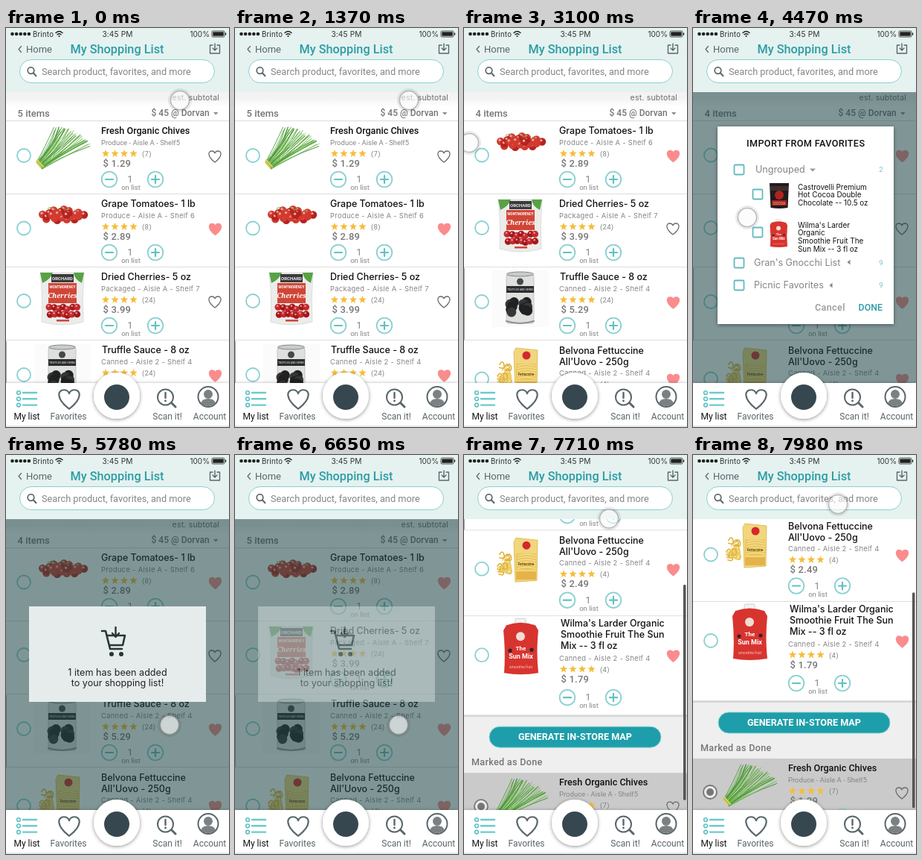
Recreate the animation shown at these times as an HTML page. Size 300x535 px, loop 8000 ms.

```html
<!DOCTYPE html>
<html lang="en">
<head>
<meta charset="utf-8">
<title>Shopping list</title>
<style>
html, body { margin: 0; width: 100%; height: 100%; overflow: hidden; background: #fff; }
svg { display: block; width: 300px; height: 535px; font-family: Roboto, sans-serif; }
.wide { font-family: Inter, sans-serif; }
</style>
</head>
<body>
<svg id="stage" viewBox="0 0 300 535" width="300" height="535"></svg>
<script>
const LOOP = 8000;
const TEAL = '#8ad0d1', DEEP = '#1d9eaa', GREY = '#858585', SLATE = '#59676b', PINK = '#fa8c8d';

// ---- drawing helpers ----
const text = (x, y, s, size, fill, o = {}) =>
  `<text x="${x}" y="${y}" font-size="${size}" fill="${fill}" font-weight="${o.w || 400}" letter-spacing="${o.ls || 0}" text-anchor="${o.a || 'start'}"${o.id ? ` id="${o.id}"` : ''}${o.wide ? ' class="wide"' : ''}>${s}</text>`;
const wide = (x, y, s, size, fill, o = {}) => text(x, y, s, size, fill, { ...o, wide: true });
const rect = (x, y, w, h, fill, more = '') => `<rect x="${x}" y="${y}" width="${w}" height="${h}" fill="${fill}" ${more}/>`;
const circle = (x, y, r, fill, more = '') => `<circle cx="${x}" cy="${y}" r="${r}" fill="${fill}" ${more}/>`;
const path = (d, fill, stroke = 'none', w = 1, more = '') =>
  `<path d="${d}" fill="${fill}" stroke="${stroke}" stroke-width="${w}" stroke-linecap="round" stroke-linejoin="round" ${more}/>`;
const group = (body, x = 0, y = 0, more = '') => `<g transform="translate(${x} ${y})" ${more}>${body}</g>`;
const many = (n, f) => Array.from({ length: n }, (_, i) => f(i)).join('');
const random = seed => () => (seed = (seed * 16807) % 2147483647) / 2147483647;

const heart = (x, y, fill, stroke, k = 1) =>
  path('M0 7.5C-11-1-9-7.5-4.2-7.5C-1.8-7.5-.4-5.8 0-4.6C.4-5.8 1.8-7.5 4.2-7.5C9-7.5 11-1 0 7.5Z',
    fill, stroke, 1.3, `transform="translate(${x} ${y}) scale(${k})"`);
const star = (x, y) => {
  const pts = Array.from({ length: 10 }, (_, i) => {
    const r = i % 2 ? 2.3 : 5.4, a = i * Math.PI / 5;
    return `${(x + r * Math.sin(a)).toFixed(1)},${(y - r * Math.cos(a)).toFixed(1)}`;
  });
  return `<polygon points="${pts.join(' ')}" fill="#f6bd3a"/>`;
};
const stepper = (x, y, plus) => circle(x, y, 10.3, '#fff', `fill-opacity=".5" stroke="${TEAL}" stroke-width="1.8"`) +
  path(`M${x - 5} ${y}h10` + (plus ? `M${x} ${y - 5}v10` : ''), 'none', '#62c1c3', 2.2);
const check = (x, y) => rect(x - 6.5, y - 6.5, 13, 13, '#fff', 'rx="1.5" stroke="#62babf" stroke-width="1.8"');

// ---- product pictures, relative to the row top ----
function chives() {
  const rnd = random(77), greens = ['#4f9f3a', '#6cb84c', '#3a852b', '#8fca6c'];
  return many(44, i => {
    const u = i / 43, a = 52 + 12 * rnd();
    const ex = 64 + 48 * u + 4 * rnd(), ey = 7 + 22 * u * u + 6 * rnd();
    return path(`M${41 + 8 * u} ${55 + 9 * u}Q${a + 14 * u} ${36 + 14 * u} ${ex} ${ey}`, 'none', greens[i % 4], .9);
  }) + path('M42 52l8 9M41 55l6 7', 'none', '#e3cf62', 2);
}
function tomatoes() {
  const rnd = random(9);
  return many(22, i => {
    const a = i * 2.4, k = Math.sqrt((22 - i) / 22);
    const x = 75.5 + 29.5 * k * Math.cos(a), y = 27.5 + 8.5 * k * Math.sin(a) + rnd();
    return circle(x, y, 5.2, i % 3 ? '#d23a30' : '#b3241f') + circle(x - 1.2, y - 1.7, 1.7, '#f4a198');
  }) + path('M56 19l6-2 5 4M74 17l7 4 5-4M92 21l5 3', 'none', '#7f9a4a', .9);
}
function cherries() {
  const rnd = random(31);
  return path('M46 7H105Q102 40 104 73Q76 81 48 73Q50 40 46 7Z', '#ececea', '#d6d6d4', .8) +
    path('M46 7h17q-3 9-14 14zM105 7h-14q1 9 11 14z', '#57a244') +
    rect(61, 9, 30, 11, '#3a3a3a') + text(76, 17, 'ORCHARD', 6, '#eee', { a: 'middle', w: 700 }) +
    rect(57, 21, 38, 27, '#cf4637') + text(76, 28, 'MONTMORENCY', 4.6, '#fff', { a: 'middle', w: 700 }) +
    `<g font-style="italic" font-family="Noto Serif, serif">${text(76, 41, 'Cherries', 9, '#fff', { a: 'middle', w: 700 })}</g>` +
    many(14, i => {
      const x = 58 + (i % 7) * 6 + rnd() * 2, y = 53 + Math.floor(i / 7) * 9 + rnd() * 3;
      return circle(x, y, 4.5, i % 2 ? '#a5161c' : '#c32a2c') + circle(x - 1, y - 1.5, 1.3, '#ea9a96');
    }) + rect(68, 70, 17, 2.5, '#cf4637');
}
function truffles() {
  const rnd = random(5);
  return rect(38, 4, 76, 76, '#fbfbfb') +
    rect(57, 9, 37, 66, '#dfdfdd', 'rx="3" stroke="#b9bcbc" stroke-width=".8"') +
    `<ellipse cx="75.5" cy="9" rx="18" ry="3" fill="#c9cccc" stroke="#85898a"/>` +
    circle(75.5, 19, 4.5, '#45484a') +
    rect(57, 25, 37, 9, '#2b2c2d') + text(75.5, 31, 'TRUFFLES AND HERBS', 3.4, '#eee', { a: 'middle' }) +
    many(14, i => circle(66 + (i % 2) * 16 + (rnd() - .5) * 8, 48 + Math.floor(i / 2) * 1.8 + (rnd() - .5) * 8, 6.5, i % 3 ? '#202122' : '#343637')) +
    path('M57 72Q75 78 94 72', 'none', '#8e9192', 2);
}
function pasta() {
  const rnd = random(13);
  return many(18, () => {
    const x = 45 + rnd() * 13, y = 30 + rnd() * 25;
    return path(`M${x} ${y}q4-7 6 0t-6 4`, 'none', rnd() > .5 ? '#dfb23a' : '#efd06c', 1.6);
  }) + path('M70 10L99 13L98 67L69 69L67 16Z', '#f1d67e', '#d9b54a', .8) + rect(70, 31, 27, 22, '#ebc75a') +
    many(6, i => path(`M72 ${34 + i * 3.4}q12-4 24 0`, 'none', '#f7e5ac', 1)) +
    circle(84, 20, 5.5, '#d5282c') + text(83.5, 47, 'Fettuccine', 4.6, '#6b4a12', { a: 'middle', w: 700 }) +
    rect(70, 55, 27, 11, '#e6b24a');
}
function smoothie() {
  return rect(69, 3, 14, 8, '#f4f4f4', 'rx="1.5" stroke="#bbb" stroke-width=".7"') +
    path('M57 12Q76 5 96 12L100 19Q97 48 100 76Q76 80 54 76Q56 48 53 19Z', '#d8342f') +
    circle(76, 27, 6, '#f3dcd6') +
    text(76.5, 46, 'The', 8, '#fff', { a: 'middle', w: 700 }) + text(76.5, 57, 'Sun Mix', 9, '#fff', { a: 'middle', w: 700 }) +
    circle(62, 46, 2.6, '#3a2030') + circle(91, 45, 2.6, '#3a2030') + text(76.5, 70, 'smoothie fruit', 5, '#f7c9c4', { a: 'middle' });
}
const cocoa = () => path('M1 1H27L25.5 34Q14 36 2.5 34Z', '#221b1c') + rect(2, 5, 24, 6, '#3d2f2e') +
  circle(14, 17, 6, '#b3211f') + rect(4, 24, 20, 7, '#a92120') + text(14, 29.5, 'COCOA', 5, '#f3d9a0', { a: 'middle' });

// ---- one product row ----
// e, b: extra drop of details and stepper; dy: title shift; r: radio height
function row(p) {
  const { y, h = 98, x = 128, e = 0, b = e, dy = 0, r = 46, bg = '#fff' } = p;
  const label = p.narrow
    ? p.title.map(s => text(x, 17.3, s, 12.6, '#111', { w: 500 })).join('') + text(128, 32, p.sub, 9.5, GREY)
    : p.title.map((s, i) => wide(x, 17.3 + dy + i * 15, s, 12.5, '#111', { w: 500 })).join('') +
      wide(128, 32 + e, p.sub, 9.4, GREY, { ls: .3 });
  return group(
    rect(0, 0, 300, h, bg) + rect(0, h - 1, 300, 1, '#dedede') + (p.edge ? rect(0, 1, 1, h - 2, '#aaa') : '') +
    p.img() +
    circle(24 - (p.done ? 1 : 0), r, 9, '#fff', `fill-opacity=".6" stroke="${p.done ? '#777' : TEAL}" stroke-width="1.8"`) +
    (p.done ? circle(23, r, 5, '#777') : '') + label +
    many(4, i => star(134 + i * 12.5, 43.5 + e)) +
    text(183, 47 + e, `(${p.n})`, 9.5, GREY, { ls: .3 }) +
    text(130.5, 61 + e, '$ ' + p.price, 13, '#777', { w: 500, ls: .2 }) +
    stepper(139, 78 + b) + stepper(201, 78 + b, true) +
    text(167, 82 + b, '1', 13, GREY, { a: 'middle' }) + text(168, 92 + b, 'on list', 9.5, GREY, { a: 'middle' }) +
    (p.fav ? heart(281.5, r + 1.5, PINK, PINK) : heart(281, r + 1.5, 'none', '#6c6c6c')), 0, y);
}

const chiveRow = { title: ['Fresh Organic Chives'], sub: 'Produce - Aisle A - Shelf5', n: 7, price: '1.29', img: chives, narrow: 1 };
const rows = [
  { y: 125, title: ['Grape Tomatoes- 1 lb'], sub: 'Produce - Aisle A - Shelf 6', n: 8, price: '2.89', fav: 1, img: tomatoes, r: 45.5 },
  { y: 223, title: ['Dried Cherries- 5 oz'], sub: 'Packaged - Aisle A - Shelf 7', n: 24, price: '3.99', img: cherries, r: 45 },
  { y: 321, x: 129, title: ['Truffle Sauce - 8 oz'], sub: 'Canned - Aisle 2 - Shelf 4', n: 24, price: '5.29', fav: 1, img: truffles, edge: 1 },
  { y: 419, h: 115, title: ['Belvona Fettuccine', "All'Uovo - 250g"], sub: 'Canned - Aisle 2 - Shelf 4', n: 4, price: '2.49', fav: 1, img: pasta, e: 15, b: 15.5, dy: 1, r: 51.5 },
  { y: 534, h: 133, x: 130, title: ["Wilma's Larder Organic", 'Smoothie Fruit The Sun', 'Mix -- 3 fl oz'], sub: 'Canned - Aisle 2 - Shelf 4', n: 4, price: '1.79', fav: 1, img: smoothie, e: 27.5, b: 31, dy: -3, r: 52 }
];

const subHeader = rect(0, 86, 300, 39, 'url(#sky)') + rect(0, 124, 300, 1, '#dcdcdc') +
  wide(287, 97, 'est. subtotal', 10.5, '#6c6c6c', { a: 'end', ls: .2 }) +
  text(15.5, 118.5, '5 items', 13, '#757575', { w: 500, id: 'count' }) +
  text(195.5, 118, '$ 45 @ Dorvan', 12, '#757575', { w: 500 }) + path('M279 113h6.5l-3.2 3.4z', '#8a8a8a');

const doneArea = rect(0, 667, 300, 78, '#efefef') + rect(0, 667, 300, 2, '#d6d6d6') +
  rect(34, 682, 231, 28, DEEP, 'rx="14" stroke="#8ad0d1"') +
  text(149.5, 700.3, 'GENERATE IN-STORE MAP', 12.6, '#fff', { w: 700, a: 'middle' }) +
  text(10, 733.5, 'Marked as Done', 12.6, '#757575', { w: 500, ls: .3 }) +
  row({ ...chiveRow, y: 744, bg: '#cacaca', done: 1, r: 45, h: 110 });

// second layer of the dissolving row
const ghost = wide(129, 161.5, 'Fresh Organic Chives', 12.5, '#777') +
  `<g opacity=".45">${group(chives(), 0, 143) + text(183, 178, '(8)', 9.5, GREY) + text(130.5, 194, '$ 1.29', 13, '#777', { w: 500 }) +
  stepper(139, 215) + stepper(201, 215, true) +
  text(168, 218, '1', 13, GREY, { a: 'middle' }) + heart(281.5, 190, PINK, PINK)}</g>`;

const storeMenu = rect(186, 108, 109, 48, '#fff', 'filter="url(#soft)"') +
  text(195.5, 124, '$ 45 @ Dorvan', 12, '#757575', { w: 500 }) + text(195.5, 146, '$ 48 @ Felmar', 12, '#757575', { w: 500 });

const statusBar = many(5, i => circle(8.5 + i * 5.6, 8, 2.3, '#222')) + text(36, 11.6, 'Brinto', 10, '#333', { ls: .3 }) +
  path('M67 6.5q4.5-4 9 0M69 8.8q2.5-2 5 0', 'none', '#222', 1.4) + circle(71.5, 11, 1.1, '#222') +
  wide(150, 11.8, '3:45 PM', 10.2, '#333', { a: 'middle', ls: .1 }) + wide(274, 11.8, '100%', 10, '#333', { a: 'end' }) +
  rect(277, 4, 17, 8, 'none', 'rx="1.5" stroke="#222" stroke-width=".8"') + rect(278.3, 5.3, 14.4, 5.4, '#222') + rect(294.8, 6.5, 1.4, 3, '#222');

const header = rect(0, 0, 300, 86, '#e5f2f0') + statusBar +
  path('M20.5 24.5l-3.5 4 3.5 4', 'none', SLATE, 1.2) + text(27, 33, 'Home', 13, SLATE) +
  text(149.5, 33.5, 'My Shopping List', 16.3, '#2c9da5', { w: 500, a: 'middle' }) +
  path('M278 23h-3.5v11h13v-11h-3.5M281 21v8.5M278 27l3 3 3-3', 'none', SLATE, 1.4) +
  rect(18.5, 42.5, 262, 31, '#fff', `rx="15.5" stroke="${TEAL}"`) +
  circle(33.5, 57, 4.3, 'none', `stroke="${SLATE}" stroke-width="1.7"`) + path('M37 60.5l3.5 3.8', 'none', SLATE, 2) +
  text(48, 62.6, 'Search product, favorites, and more', 12.75, '#858585');

const tab = (x, s, fill) => text(x, 525, s, 12, fill, { a: 'middle' });
const tabs = rect(0, 476, 300, 59, '#fff', 'filter="url(#soft)"') + rect(0, 476, 300, 59, '#fff') + rect(0, 533.5, 300, 1, '#d0d0d0') +
  many(3, i => circle(17, 489 + i * 8.3, 2.4, 'none', 'stroke="#4cbcc0" stroke-width="1.4"') + path(`M23 ${489 + i * 8.3}h18`, 'none', '#6ccacb', 2.4)) +
  tab(28, 'My list', '#111') + heart(85, 498, 'none', SLATE, 1.7) + tab(84, 'Favorites', SLATE) +
  circle(214.5, 495, 10.5, 'none', `stroke="${SLATE}" stroke-width="2"`) + path('M222.5 502.5l5.5 5.5', 'none', SLATE, 3) +
  path('M214.5 489v7', 'none', SLATE, 2.4) + circle(214.5, 500, 1.4, SLATE) + tab(217, 'Scan it!', SLATE) +
  circle(272, 494.5, 13.5, '#fff', `stroke="${SLATE}" stroke-width="2"`) + circle(272, 491, 6, '#7b8183') +
  path('M262 503q2-6 10-6t10 6q-10 8-20 0z', '#7b8183') + tab(274, 'Account', SLATE) +
  circle(149, 493, 31, '#fff', 'filter="url(#soft)"') + circle(149, 495, 17, '#37474f');

const folder = (y, s) => check(62, y) + wide(82, y + 3.5, s, 12.6, GREY) + text(253, y + 3, '9', 9.5, '#74c4c8', { a: 'middle' });
const lines = (y, list) => list.map((s, i) => wide(141, y + i * 10.9, s, 9.9, '#111')).join('');
const modal = rect(33, 132, 237, 265, '#fff', 'filter="url(#soft)"') +
  text(151.7, 159, 'IMPORT FROM FAVORITES', 12.6, '#111', { a: 'middle', w: 500, ls: .4 }) +
  check(62, 190) + wide(84, 194, 'Ungrouped', 12.6, GREY) + path('M157 188.5h8l-4 4z', '#999') +
  text(253, 193, '2', 9.5, '#74c4c8', { a: 'middle' }) +
  check(87, 223) + group(cocoa(), 102, 207) + lines(216.5, ['Castrovelli Premium', 'Hot Cocoa Double', 'Chocolate -- 10.5 oz']) +
  check(87, 274) + `<g id="tick">${rect(82, 269, 10, 10, '#62babf') + path('M84 274l2.2 2.3 4-4.6', 'none', '#fff', 1.4)}</g>` +
  `<g transform="translate(77 255) scale(.5)">${smoothie()}</g>` +
  lines(267.5, ["Wilma's Larder", 'Organic', 'Smoothie Fruit The', 'Sun Mix -- 3 fl oz']) +
  folder(315, "Gran's Gnocchi List") + path('M211.5 310.5v7l-4-3.5z', '#888') +
  folder(345, 'Picnic Favorites') + path('M187.5 341.5v7l-4-3.5z', '#888') +
  text(164, 379, 'Cancel', 12.5, '#999', { w: 500, ls: .4 }) + text(222.5, 379, 'DONE', 12.3, '#2c9da5', { w: 500, ls: .1 });

const toast = rect(31, 203, 238, 128, '#e6ecec') +
  path('M129 236h5l6 24h16M136 242h24l-3 13h-18', 'none', '#273636', 2.6) + circle(142, 267, 3, '#273636') + circle(155, 267, 3, '#273636') +
  path('M147.5 231v12M143 239l4.5 5 4.5-5', 'none', '#273636', 2.4) +
  wide(150, 295.5, '1 item has been added', 12.6, '#222', { a: 'middle' }) +
  wide(150, 309.5, 'to your shopping list!', 12.6, '#222', { a: 'middle' });

const touch = circle(0, 0, 14, 'none', 'stroke="#000" stroke-opacity=".08" stroke-width="4"') +
  circle(0, 0, 12.5, '#fafafa', 'fill-opacity=".62" stroke="#8a8a8a" stroke-opacity=".5" stroke-width="1.6"');

document.getElementById('stage').innerHTML =
  `<defs><filter id="soft" x="-20%" y="-20%" width="140%" height="140%"><feDropShadow dx="0" dy="1" stdDeviation="2.5" flood-opacity=".45"/></filter>
  <linearGradient id="sky" x2="0" y2="1"><stop offset=".2" stop-color="#f3f3f3"/><stop offset=".5" stop-color="#fff"/></linearGradient>
  <clipPath id="view"><rect y="86" width="300" height="391"/></clipPath></defs>` +
  rect(0, 0, 300, 535, '#efefef') +
  `<g clip-path="url(#view)"><g id="scroll">
    <g id="fading">${rect(0, 125, 300, 98, '#f6f6f6')}<g id="old">${row({ ...chiveRow, y: 125 })}</g>
      <g id="ghost">${rect(0, 126, 300, 16, '#ddd', 'opacity=".4"') + ghost}</g>
      <g id="dot">${circle(24, 171, 5.5, '#7fcbcd', 'opacity=".75"')}</g></g>
    <g id="list">${rows.map(row).join('') + doneArea}</g>${subHeader}</g>
    <g id="bar">${rect(295, 0, 3.5, 289, '#555', 'rx="1.7"')}</g>
    <g id="menu">${storeMenu}</g><g id="shade">${rect(0, 86, 300, 391, '#1e4444', 'opacity=".56"')}</g></g>` +
  header + tabs + `<g id="modal">${modal}</g><g id="toast">${toast}</g><g id="touch">${touch}</g>`;

// ---- motion ----
const $ = {};
document.querySelectorAll('[id]').forEach(n => $[n.id] = n);
const span = (t, a, b) => Math.min(1, Math.max(0, (t - a) / (b - a)));
const ease = u => (1 - Math.cos(Math.PI * u)) / 2;
const show = (n, on) => n.setAttribute('display', on ? 'inline' : 'none');
const move = (n, x, y) => n.setAttribute('transform', `translate(${x.toFixed(2)} ${y.toFixed(2)})`);

// start, end, end point, bend point
const moves = [
  [1370, 1810, 74, 160, 180, 60], [1970, 2100, 7, 154, 66, 128], [3100, 3550, 270, 10, 120, 40],
  [3970, 4470, 73, 254, 190, 140], [5210, 5580, 220, 362, 140, 320], [6780, 6980, 208, 386, 215, 375]
];
function touchAt(t) {
  if (t >= 7010) {
    const p = ease(span(t, 7010, 7750)), q = ease(span(t, 7850, 7980));
    return [208 - 13 * p, 386 - 261 * p - 42 * p * p - 17 * q];
  }
  let x = 234, y = 97;
  for (const [a, b, ex, ey, bx, by] of moves) {
    if (t < a) break;
    const u = ease(span(t, a, b)), v = 1 - u;
    x = v * v * x + 2 * u * v * bx + u * u * ex;
    y = v * v * y + 2 * u * v * by + u * u * ey;
  }
  return [x, y];
}

function draw(t) {
  const slide = 1 - Math.pow(1 - span(t, 2700, 2900), 2);
  const dissolve = t >= 2360;
  move($.list, 0, 98 * (1 - slide));
  show($.fading, t < 2900);
  $.old.setAttribute('opacity', dissolve ? .5 * (1 - slide) : 1);
  show($.ghost, dissolve);
  $.ghost.setAttribute('opacity', .75 * (1 - slide));
  show($.dot, t >= 2300);
  $.count.textContent = (t < 2300 || t >= 6180 ? 5 : 4) + ' items';

  const off = 320 * ease(span(t, 7010, 7750)) + 17 * ease(span(t, 7850, 7980));
  move($.scroll, 0, -off);
  move($.bar, 0, off * .547);
  show($.bar, t >= 7010);

  show($.menu, t >= 200 && t < 870);
  show($.shade, t >= 3770 && t < 7010);
  show($.modal, t >= 3770 && t < 5780);
  show($.tick, t >= 5010);
  show($.toast, t >= 5780 && t < 6980);
  $.toast.setAttribute('opacity', 1 - .59 * span(t, 6180, 6650) - .41 * span(t, 6780, 6980));
  move($.touch, ...touchAt(t));
}

const start = performance.now();
function tick() {
  draw((performance.now() - start) % LOOP);
  requestAnimationFrame(tick);
}
tick();
</script>
</body>
</html>
```
